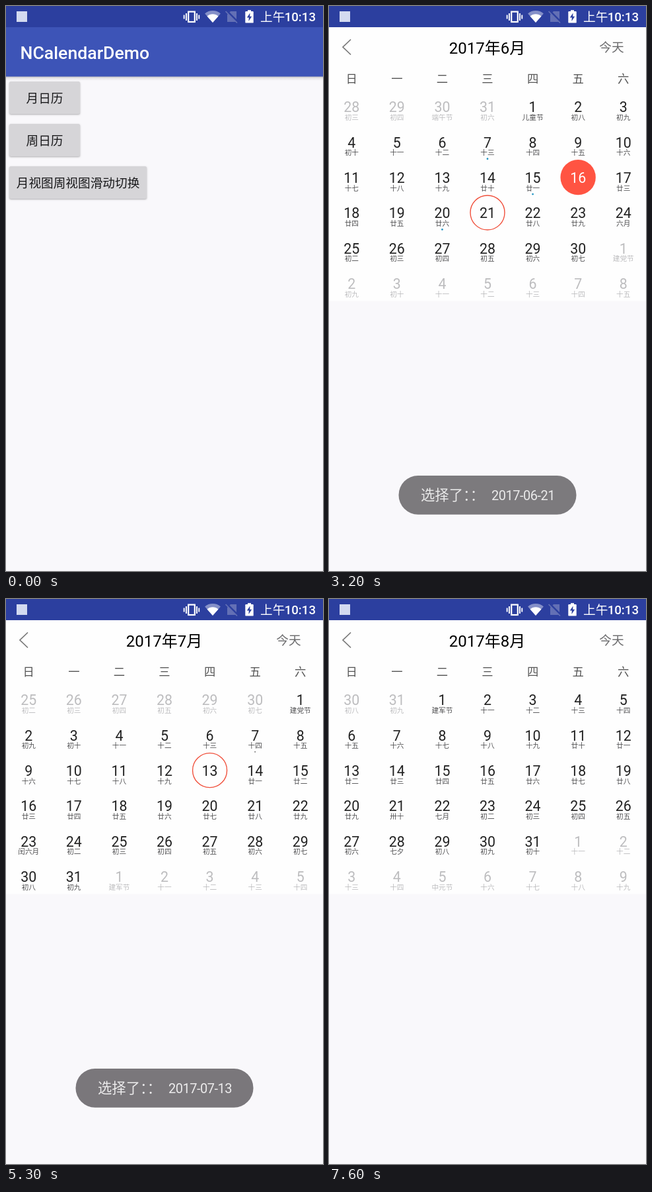
Animation of 480 by 853 pixels, one loop 8 s. Source, as an HTML page with a canvas:

```html
<!DOCTYPE html>
<html lang="zh-CN">
<head>
<meta charset="utf-8">
<title>Calendar demo</title>
<style>
html, body { margin: 0; width: 100%; height: 100%; overflow: hidden; background: #f9f8fb; }
canvas { display: block; width: 480px; height: 853px; }
</style>
</head>
<body>
<canvas id="stage"></canvas>
<script>
const W = 480, H = 853, LOOP = 8000;
const FONT = 'Roboto, "Noto Sans CJK SC", "Noto Sans CJK", sans-serif';
const BG = '#f9f8fb', NAVY = '#2c3f9f', RED = '#ff5442';
const dpr = window.devicePixelRatio || 1;

function makeCtx(canvas) {
  canvas.width = W * dpr;
  canvas.height = H * dpr;
  const c = canvas.getContext('2d');
  c.scale(dpr, dpr);
  return c;
}
const screen = makeCtx(document.getElementById('stage'));
const layer = makeCtx(document.createElement('canvas'));
let g = screen;

const clamp = v => Math.min(1, Math.max(0, v));
const span = (t, start, length) => clamp((t - start) / length);
const easeOut = (p, n) => 1 - (1 - p) ** n;

function rect(x, y, w, h, color) {
  g.fillStyle = color;
  g.fillRect(x, y, w, h);
}
function roundRect(x, y, w, h, r, color) {
  g.fillStyle = color;
  g.beginPath();
  g.roundRect(x, y, w, h, r);
  g.fill();
}
function circle(x, y, r) {
  g.beginPath();
  g.arc(x, y, r, 0, Math.PI * 2);
}
function poly(points, color) {
  g.fillStyle = color;
  g.beginPath();
  points.forEach(([x, y]) => g.lineTo(x, y));
  g.fill();
}
// y is the vertical middle of the line
function text(s, x, y, size, color, align = 'center', weight = 400) {
  g.font = `${weight} ${size}px ${FONT}`;
  g.textAlign = align;
  g.fillStyle = color;
  g.fillText(s, x, y + size * 0.365);
}

// Status bar

function wifi(r, color) {
  g.fillStyle = color;
  g.beginPath();
  g.moveTo(313, 25);
  g.arc(313, 25, r, -Math.PI * 0.73, -Math.PI * 0.27);
  g.fill();
}
function statusIcons() {
  rect(16, 8, 16, 16, '#d3daf0');

  g.strokeStyle = '#fff';
  g.lineWidth = 2.2;
  g.strokeRect(276.2, 8.6, 9.6, 15.4);
  rect(272, 11, 1.9, 11, '#fff');
  rect(268.7, 13.5, 1.9, 6, '#fff');
  rect(288, 11, 1.9, 11, '#fff');
  rect(291.3, 13.5, 1.9, 6, '#fff');

  wifi(18, '#8590c8');
  wifi(12.8, '#fff');

  poly([[340, 8], [349, 8], [349, 24], [335, 24], [335, 13]], '#6370b5');
  g.lineWidth = 3.6;
  g.strokeStyle = NAVY;
  g.beginPath();
  g.moveTo(333, 6.5);
  g.lineTo(351, 24.5);
  g.stroke();
  g.lineWidth = 1.7;
  g.strokeStyle = '#6370b5';
  g.beginPath();
  g.moveTo(332.5, 8);
  g.lineTo(350, 25.5);
  g.stroke();

  roundRect(362.3, 8, 12.4, 17.6, 1.2, '#fff');
  rect(366, 6.2, 5, 2.5, '#fff');
  poly([[369.5, 10.5], [364.8, 17.6], [367.8, 17.6], [367.4, 23], [372.2, 15.8], [369.2, 15.8]], NAVY);

  text('上午', 385, 16, 18.67, '#fff', 'left');
  text('10:13', 469, 16.3, 18.67, '#fff', 'right', 500);
}

// Menu window

function button(label, y, w, lift) {
  g.save();
  g.shadowColor = 'rgba(0,0,0,.3)';
  g.shadowBlur = (2.5 + lift * 2) * dpr;
  g.shadowOffsetY = (1 + lift * 0.7) * dpr;
  roundRect(5, y, w, 49, 2.5, '#d6d5d8');
  g.restore();
  return () => text(label, 5 + w / 2, y + 25, 18.67, '#19191b');
}
function menu(t) {
  rect(0, 0, W, H, BG);
  const shade = g.createLinearGradient(0, 106, 0, 113);
  shade.addColorStop(0, 'rgba(0,0,0,.27)');
  shade.addColorStop(0.4, 'rgba(0,0,0,.08)');
  shade.addColorStop(1, 'rgba(0,0,0,0)');
  rect(0, 106, W, 7, shade);
  rect(0, 32, W, 74.5, '#3d54b7');
  rect(0, 0, W, 32, NAVY);
  text('NCalendarDemo', 21.5, 70.5, 26.67, '#fff', 'left', 500);

  const press = span(t, 1450, 150);
  const label = button('月日历', 114, 107, press);
  if (press > 0) {
    const fade = 1 - span(t, 1850, 300);
    g.save();
    g.beginPath();
    g.roundRect(5, 114, 107, 49, 2.5);
    g.clip();
    rect(5, 114, 107, 49, `rgba(0,0,0,${0.06 * press * fade})`);
    g.fillStyle = `rgba(0,0,0,${0.045 * press * fade})`;
    circle(78, 145, 64 * Math.max(0, t - 1450) / 250);
    g.fill();
    g.restore();
  }
  label();
  button('周日历', 178, 107, 0)();
  button('月视图周视图滑动切换', 242, 208, 0)();
}

// Calendar window

const DAY = 86400000;
const date = (m, d) => Date.UTC(2017, m - 1, d);
const LUNAR_MONTHS = [
  [date(5, 26), '五月'], [date(6, 24), '六月'], [date(7, 23), '闰六月'], [date(8, 22), '七月']
];
const FEASTS = {
  '5-30': '端午节', '6-1': '儿童节', '7-1': '建党节', '8-1': '建军节', '8-28': '七夕', '9-5': '中元节'
};
const MARKED = ['6-7', '6-15', '6-20', '7-7'];

function lunar(time, key) {
  if (FEASTS[key]) return FEASTS[key];
  const [start, name] = LUNAR_MONTHS.filter(m => m[0] <= time).pop();
  const n = (time - start) / DAY + 1;
  if (n === 1) return name;
  if (n === 10) return '初十';
  return '初十廿卅'[Math.floor(n / 10)] + '十一二三四五六七八九'[n % 10];
}

const colX = c => (c + 0.5) * W / 7;

function monthPage(month, left, picked) {
  const first = date(month, 1);
  const start = first - new Date(first).getUTCDay() * DAY;
  for (let i = 0; i < 42; i++) {
    const time = start + i * DAY;
    const day = new Date(time);
    const m = day.getUTCMonth() + 1, d = day.getUTCDate(), key = m + '-' + d;
    const x = left + colX(i % 7), y = 152.6 + Math.floor(i / 7) * 53.33;
    const inside = m === month;
    const today = inside && key === '6-16';
    const ring = inside && key === picked;
    if (today) {
      g.fillStyle = RED;
      circle(x, y - 0.6, 26.7);
      g.fill();
    } else if (ring) {
      g.strokeStyle = '#f0503c';
      g.lineWidth = 1.4;
      circle(x, y - 0.6, 26);
      g.stroke();
    }
    text(d, x, y, 21.33, today ? '#fff' : inside ? '#222' : '#bdbdbf');
    if (today || ring) continue;
    text(lunar(time, key), x, y + 15.6, 10.67, inside ? '#505052' : '#bdbdbf');
    if (inside && MARKED.includes(key)) {
      g.fillStyle = month === 7 ? '#777' : '#2496c4';
      circle(x, y + 24.8, month === 7 ? 1 : 1.4);
      g.fill();
    }
  }
}

// Finger drag followed by a settling glide, as a share of the page width
function swipe(t, start, release, end, reach) {
  const drag = reach * span(t, start, release - start);
  return drag + (1 - reach) * easeOut(span(t, release, end - release), 5);
}

function calendar(t) {
  rect(0, 0, W, H, BG);
  rect(0, 32, W, 413.5, '#fefefe');
  rect(0, 0, W, 32, NAVY);

  g.strokeStyle = '#777';
  g.lineWidth = 1.7;
  g.beginPath();
  g.moveTo(33, 50.5);
  g.lineTo(21, 62);
  g.lineTo(33, 73.5);
  g.stroke();

  const month = t < 4300 ? 6 : t < 6250 ? 7 : 8;
  text(`2017年${month}月`, 239.5, 63, 24, '#000');
  text('今天', 428, 62.5, 18.67, '#6a6a6c');
  [...'日一二三四五六'].forEach((s, i) => text(s, colX(i), 109.5, 17.33, '#555'));

  const picked = t >= 5000 ? '7-13' : t >= 2800 ? '6-21' : '';
  const pos = swipe(t, 4050, 4300, 4900, 0.469) + swipe(t, 6050, 6250, 6650, 0.45);
  g.save();
  g.beginPath();
  g.rect(0, 128, W, 317.5);
  g.clip();
  for (let i = 0; i < 3; i++) {
    if (Math.abs(i - pos) < 1) monthPage(6 + i, (i - pos) * W, picked);
  }
  g.restore();
}

function toast(day, alpha) {
  if (alpha <= 0) return;
  g.save();
  g.globalAlpha = alpha;
  roundRect(105.5, 709, 269, 58.7, 29.3, '#656266');
  text('选择了：：', 139, 738.5, 21.33, '#fff', 'left');
  g.letterSpacing = '-0.5px';
  text(day, 246, 739, 20, '#fff', 'left');
  g.restore();
}

function render(t) {
  const open = t - 1805;
  g = screen;
  if (open < 260) menu(t);
  if (open > 0) {
    g = layer;
    calendar(t);
    g = screen;
    g.globalAlpha = easeOut(clamp(open / 200), 3);
    const y = H * 0.08 * (1 - easeOut(clamp(open / 260), 5));
    g.drawImage(layer.canvas, 0, y, W, H);
    g.globalAlpha = 1;
  }
  statusIcons();
  toast('2017-06-21', easeOut(span(t, 2900, 500), 2) * (1 - span(t, 4990, 300) ** 2));
  toast('2017-07-13', easeOut(span(t, 4990, 500), 2) * (1 - span(t, 6950, 550) ** 2));
}

let begin;
function frame(now) {
  begin ??= now;
  render((now - begin) % LOOP);
  requestAnimationFrame(frame);
}
requestAnimationFrame(frame);
</script>
</body>
</html>
```
